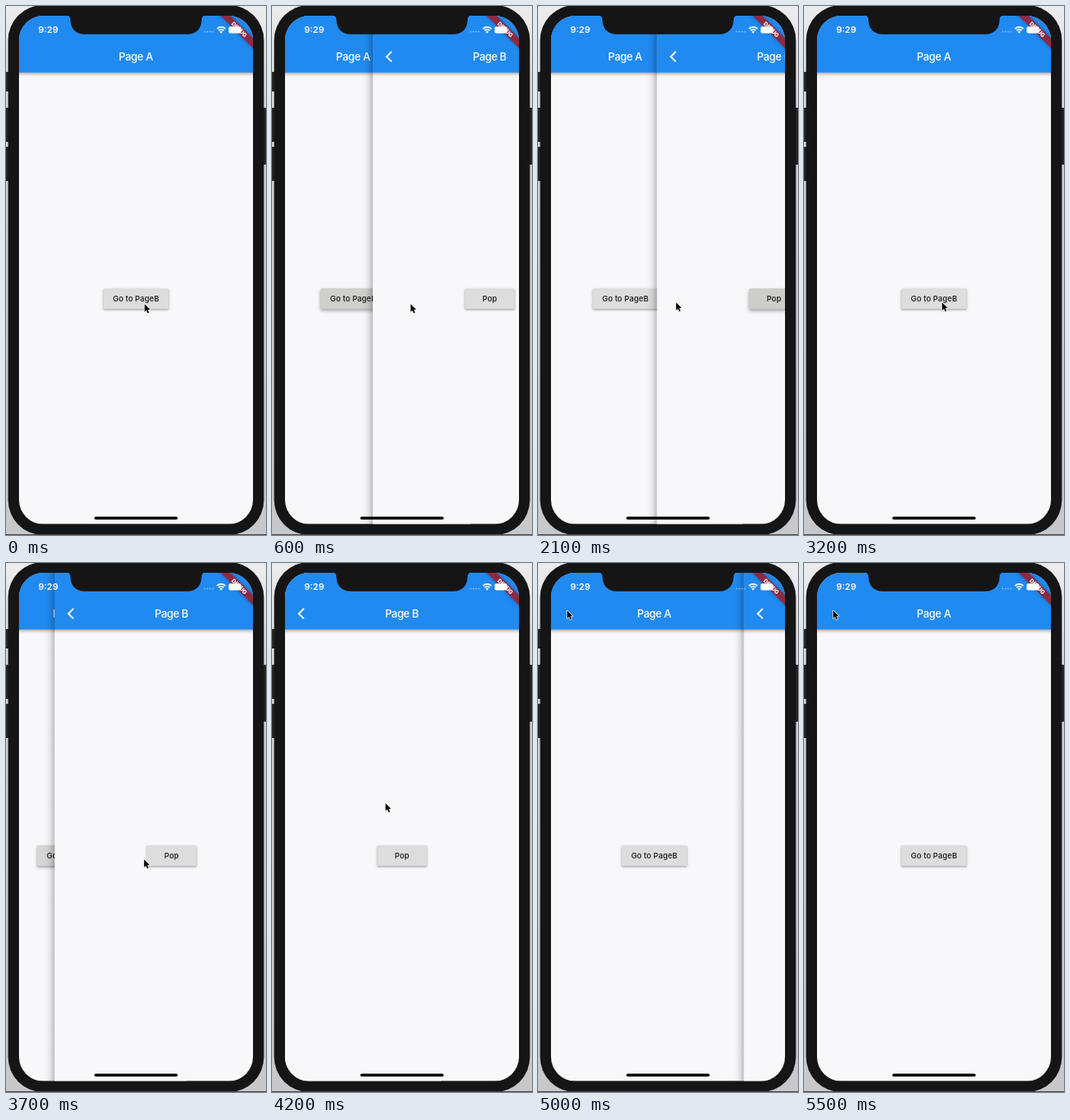
Recreate the animation shown at these times as an HTML page with a canvas. Size 320x650 px, loop 5600 ms.

```html
<!DOCTYPE html>
<html lang="en">
<head>
<meta charset="utf-8">
<title>Page navigation</title>
<style>
html, body { margin: 0; width: 100%; height: 100%; overflow: hidden; background: #d4d3d6; }
canvas { display: block; width: 320px; height: 650px; }
</style>
</head>
<body>
<canvas id="stage"></canvas>
<script>
const W = 320, H = 650, LOOP = 5600, STEP = 100;
const SCREEN = { x: 16, y: 12, w: 288, h: 624.7, r: 30 };
const BAR_BOTTOM = 82;
const SLIDE_MS = 400;
const SLIDES = [
  { at: 500, push: true },
  { at: 2030, push: false },
  { at: 3541, push: true },
  { at: 4850, push: false }
];
const PRESSES = { a: [400, 3440], b: [1930] };

const canvas = document.getElementById('stage');
const ctx = canvas.getContext('2d');
const ratio = window.devicePixelRatio || 1;
canvas.width = W * ratio;
canvas.height = H * ratio;

const clamp = v => Math.max(0, Math.min(1, v));
const mix = (a, b, p) => a + (b - a) * p;
const smooth = p => p * p * (3 - 2 * p);

// Cubic bezier easing, solved by bisection
function bezier(x1, y1, x2, y2) {
  const at = (a, b, s) => 3 * (1 - s) * (1 - s) * s * a + 3 * (1 - s) * s * s * b + s * s * s;
  return x => {
    if (x <= 0 || x >= 1) return clamp(x);
    let lo = 0, hi = 1;
    for (let i = 0; i < 24; i++) {
      const mid = (lo + hi) / 2;
      if (at(x1, x2, mid) < x) lo = mid; else hi = mid;
    }
    return at(y1, y2, lo);
  };
}
const slideEase = bezier(0.35, 0.91, 0.33, 0.97);

// 0: page A shown, 1: page B fully over it
function coverage(t) {
  let cover = 0;
  for (const s of SLIDES) {
    if (t < s.at) break;
    const p = slideEase((t - s.at) / SLIDE_MS);
    cover = s.push ? p : 1 - p;
  }
  return cover;
}

function pressLevel(t, times) {
  return Math.max(...times.map(at => {
    const d = t - at;
    return d < 0 ? 0 : clamp(d / 80) * clamp((340 - d) / 160);
  }));
}

function fillRound(x, y, w, h, r, color) {
  ctx.fillStyle = color;
  ctx.beginPath();
  ctx.roundRect(x, y, w, h, r);
  ctx.fill();
}

function label(text, x, y, size, weight, color, spacing = 0) {
  ctx.font = `${weight} ${size}px Inter, Roboto, sans-serif`;
  ctx.letterSpacing = spacing + 'px';
  ctx.textAlign = 'center';
  ctx.textBaseline = 'alphabetic';
  ctx.fillStyle = color;
  ctx.fillText(text, x, y);
}

function withShadow(color, blur, dy, draw) {
  ctx.save();
  ctx.shadowColor = color;
  ctx.shadowBlur = blur * ratio;
  ctx.shadowOffsetY = dy * ratio;
  draw();
  ctx.restore();
}

function button(text, w, press) {
  const x = 160 - w / 2;
  withShadow('rgba(0,0,0,0.36)', 2.5 + press * 2, 1.2 + press, () =>
    fillRound(x, 347, w, 25.2, 1.5, '#dddddd'));
  if (press) fillRound(x, 347, w, 25.2, 1.5, `rgba(60,60,45,${0.1 * press})`);
  label(text, 160, 362.5, 9.5, 500, '#151515', 0.1);
}

function page(dx, title, text, buttonWidth, press, hasBack) {
  ctx.save();
  ctx.translate(dx, 0);
  ctx.beginPath();
  ctx.rect(SCREEN.x, SCREEN.y, SCREEN.w, SCREEN.h);
  ctx.clip();
  ctx.fillStyle = '#f8f7fa';
  ctx.fillRect(SCREEN.x, SCREEN.y, SCREEN.w, SCREEN.h);
  withShadow('rgba(0,0,0,0.4)', 4, 1.3, () => {
    ctx.fillStyle = '#208af1';
    ctx.fillRect(SCREEN.x - 6, 0, SCREEN.w + 12, BAR_BOTTOM - 0.4);
  });
  label(title, 159.8, 66.8, 13, 500, '#fff', -0.35);
  if (hasBack) {
    ctx.strokeStyle = '#fff';
    ctx.lineWidth = 2;
    ctx.beginPath();
    ctx.moveTo(39.2, 56);
    ctx.lineTo(33, 62.2);
    ctx.lineTo(39.2, 68.4);
    ctx.stroke();
  }
  button(text, buttonWidth, press);
  ctx.restore();
}

function edgeShadow(x) {
  const w = 14.4;
  const g = ctx.createLinearGradient(x - w, 0, x, 0);
  [[0, 0], [0.3, 0.016], [0.6, 0.07], [1, 0.24]].forEach(([stop, a]) =>
    g.addColorStop(stop, `rgba(0,0,0,${a})`));
  ctx.fillStyle = g;
  ctx.fillRect(x - w, SCREEN.y, w, SCREEN.h);
}

function statusBar() {
  label('9:29', 52, 33.2, 11, 600, '#fff');
  ctx.fillStyle = 'rgba(255,255,255,0.4)';
  for (let i = 0; i < 4; i++) ctx.fillRect(243.5 + i * 3.4, 30.8, 2, 1.5);

  ctx.strokeStyle = '#fff';
  ctx.lineWidth = 1.7;
  for (const r of [4.4, 7.3]) {
    ctx.beginPath();
    ctx.arc(264.8, 33.2, r, -Math.PI * 0.75, -Math.PI * 0.25);
    ctx.stroke();
  }
  ctx.fillStyle = '#fff';
  ctx.beginPath();
  ctx.moveTo(264.8, 33.8);
  ctx.arc(264.8, 33.5, 2.5, -Math.PI * 0.75, -Math.PI * 0.25);
  ctx.fill();

  fillRound(274, 25.2, 15.5, 8.2, 2.2, '#fff');
  fillRound(290.2, 27.8, 1.3, 3, 0.6, 'rgba(255,255,255,0.6)');
}

function banner() {
  ctx.save();
  ctx.translate(SCREEN.x + SCREEN.w, SCREEN.y);
  ctx.rotate(Math.PI / 4);
  withShadow('rgba(0,0,0,0.4)', 4, 0, () => {
    ctx.fillStyle = 'rgba(170,28,40,0.8)';
    ctx.fillRect(-40, 19.5, 80, 8.6);
  });
  label('DEBUG', 0, 26.3, 6.9, 800, '#fff', -0.1);
  ctx.restore();
}

function notch() {
  ctx.fillStyle = '#151516';
  ctx.beginPath();
  ctx.moveTo(73, 11);
  ctx.quadraticCurveTo(79.3, 11.5, 79.3, 17);
  ctx.bezierCurveTo(79.5, 28, 86, 34.8, 97, 34.8);
  ctx.lineTo(223, 34.8);
  ctx.bezierCurveTo(234, 34.8, 240.5, 28, 240.7, 17);
  ctx.quadraticCurveTo(240.7, 11.5, 247, 11);
  ctx.fill();
}

function device() {
  const g = ctx.createLinearGradient(0, 0, 0, H);
  g.addColorStop(0, '#ececed');
  g.addColorStop(0.3, '#cfced1');
  g.addColorStop(1, '#c8c7ca');
  ctx.fillStyle = g;
  ctx.fillRect(0, 0, W, H);
  for (const [x, y, h] of [[0, 81, 24], [0, 125, 42], [0, 173, 42], [316, 125, 70]])
    fillRound(x, y, 4, h, 0.5, '#252526');
  fillRound(2.6, -1, 314.8, 651, 43, '#151516');
  ctx.fillStyle = '#48484a';
  ctx.fillRect(0, 649, W, 1);
}

function cursor(t) {
  const nudge = clamp((t - 600) / 300);
  const p = smooth(clamp((t - 4000) / 650));
  const x = mix(mix(170.6, 169.9, nudge), 35.9, p);
  const y = mix(mix(366.3, 364.3, nudge), 58.5, p);
  ctx.save();
  ctx.translate(x, y);
  ctx.beginPath();
  [[0, 0], [0, 9.6], [2.2, 7.6], [3.9, 11.3], [5.6, 10.5], [4, 7], [6.9, 6.8]]
    .forEach(([px, py]) => ctx.lineTo(px, py));
  ctx.closePath();
  ctx.lineJoin = 'round';
  ctx.lineWidth = 1.2;
  ctx.strokeStyle = '#fff';
  ctx.stroke();
  ctx.fillStyle = '#080808';
  ctx.fill();
  ctx.restore();
}

function draw(t) {
  ctx.setTransform(ratio, 0, 0, ratio, 0, 0);
  device();
  const cover = coverage(t);
  const dx = SCREEN.w * (1 - cover);

  ctx.save();
  ctx.beginPath();
  ctx.roundRect(SCREEN.x, SCREEN.y, SCREEN.w, SCREEN.h, SCREEN.r);
  ctx.clip();
  page(-cover * SCREEN.w / 3, 'Page A', 'Go to PageB', 80.6, pressLevel(t, PRESSES.a), false);
  if (cover > 0) {
    if (cover < 1) edgeShadow(SCREEN.x + dx);
    page(dx, 'Page B', 'Pop', 61.4, pressLevel(t, PRESSES.b), true);
  }
  banner();
  statusBar();
  fillRound(108.7, 627.6, 102.6, 3.5, 1.75, '#000');
  ctx.restore();

  notch();
  cursor(t);
}

const start = performance.now();
function tick() {
  const t = (performance.now() - start) % LOOP;
  draw(Math.floor(t / STEP) * STEP);
  requestAnimationFrame(tick);
}
tick();
</script>
</body>
</html>
```
